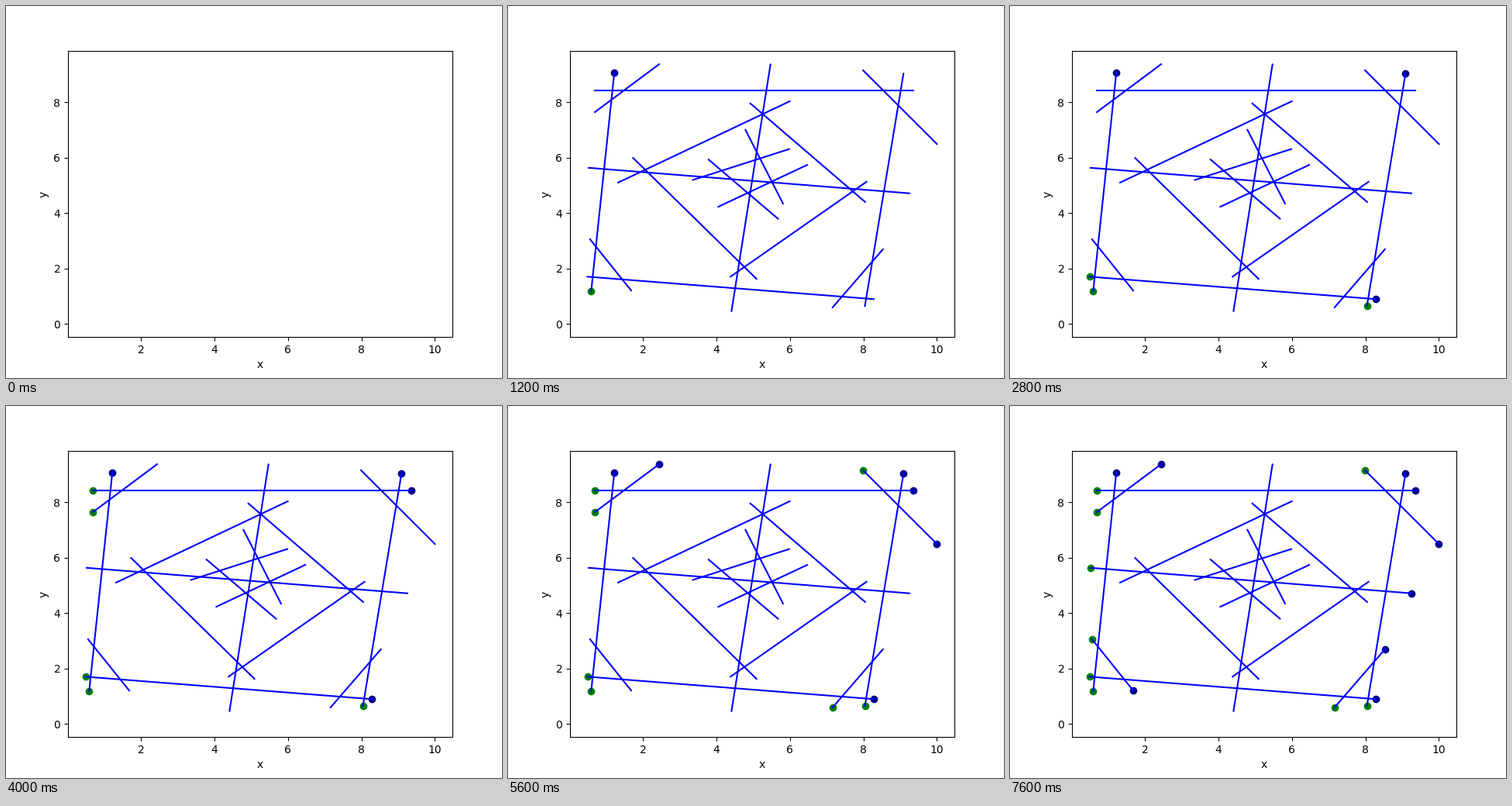
A matplotlib script that plays this animation: 640 px wide and 480 px high, repeating every 8000 ms.

```python
import numpy as np
import matplotlib.pyplot as plt
from matplotlib.animation import FuncAnimation

INTERVAL = 400
HASH_LENGTH = 2.85


def ring(corners, overshoots):
    """Sides of a polygon, each running past both of its corners."""
    corners = np.array(corners)
    for a, b, extra in zip(corners, np.roll(corners, -1, axis=0), overshoots):
        step = (b - a) / np.linalg.norm(b - a) * extra
        yield a - step, b + step


def stroke(x, y, degrees, length=HASH_LENGTH):
    """Straight stroke around a centre point."""
    angle = np.radians(degrees)
    half = length / 2 * np.array([np.cos(angle), np.sin(angle)])
    return np.array([x, y]) - half, np.array([x, y]) + half


# Start and end points, in the order in which they get marked.
outer = [
    ((0.59, 1.18), (1.22, 9.07)),    # left side
    ((0.49, 1.71), (8.28, 0.90)),    # bottom side
    ((8.04, 0.65), (9.09, 9.04)),    # right side
    ((0.69, 8.43), (9.36, 8.43)),    # top side
    ((0.69, 7.65), (2.44, 9.38)),    # corner cuts
    ((7.99, 9.16), (10.0, 6.50)),
    ((7.16, 0.60), (8.53, 2.70)),
    ((0.56, 3.06), (1.68, 1.21)),
    ((0.52, 5.64), (9.25, 4.72)),    # middle line
]
spine = ((4.41, 0.47), (5.47, 9.37))
diamond = ring([(2.06, 5.57), (5.26, 7.58), (7.71, 4.79), (4.76, 2.06)],
               [0.87, 0.51, 0.51, 0.54])
hash_marks = [stroke(4.67, 5.76, 23), stroke(5.26, 4.99, 32),
              stroke(4.73, 4.87, -48.5), stroke(5.30, 5.68, -69)]

fig, ax = plt.subplots(figsize=(6.4, 4.8), dpi=100)
lines = [ax.plot(*zip(start, end), color="blue")[0]
         for start, end in [*outer, spine, *diamond, *hash_marks]]
dots = [ax.scatter(*point, color=color)
        for ends in outer
        for point, color in zip(ends, ("green", "darkblue"))]
ax.set(xlabel="x", ylabel="y", xlim=(0.0145, 10.4755), ylim=(-0.47, 9.87))


def update(frame):
    """Empty axes, then all segments, then one more endpoint per frame."""
    for line in lines:
        line.set_visible(frame >= 1)
    for k, dot in enumerate(dots):
        dot.set_visible(frame >= k + 2)
    return lines + dots


anim = FuncAnimation(fig, update, frames=len(dots) + 2, interval=INTERVAL,
                     repeat=True, repeat_delay=0)
plt.show()
```
